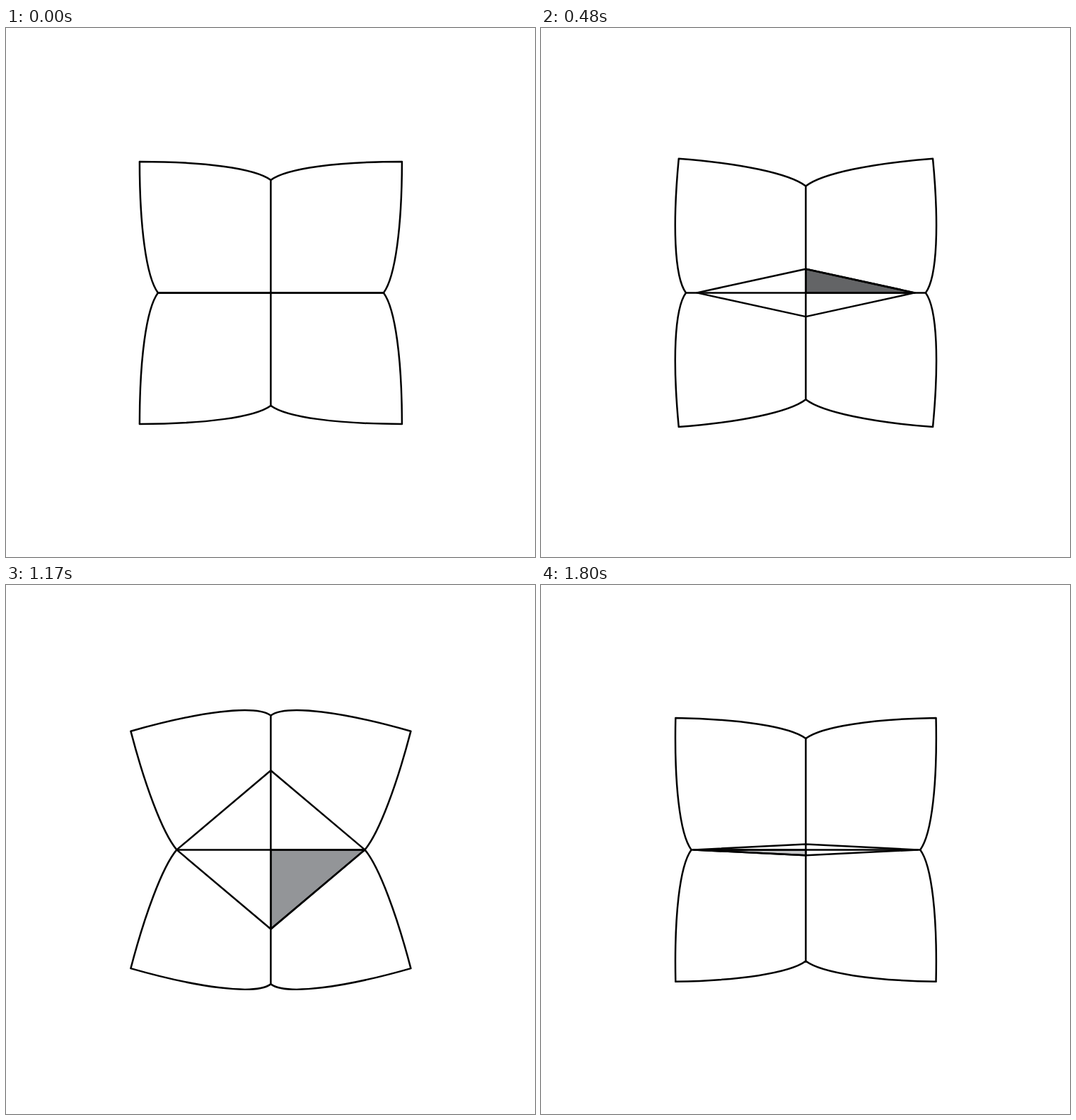
Recreate the animation shown at these times as an HTML page. Size 748 by 748 pixels, loop 1.83 s.

```html
<!DOCTYPE html>
<html lang="en">
<head>
<meta charset="utf-8">
<title>Paper fortune teller</title>
<style>
  html, body { margin: 0; width: 100%; height: 100%; overflow: hidden; background: #fff; }
  svg { display: block; width: 100vw; height: 100vh; }
  path { fill: none; stroke: #000; stroke-width: 2.5; stroke-linejoin: round; stroke-linecap: round; }
</style>
</head>
<body>
<svg viewBox="0 0 748 748">
  <g transform="translate(374.4 374.4)">
    <path id="outline"/>
    <path id="flap"/>
    <path id="diamond"/>
    <path id="cross"/>
  </g>
</svg>
<script>
const STEP = 30, LOOP = 1830;

// Moments when the paper is alternately closed and fully open
const KEYS = [0, 195, 420, 645, 885, 1125, 1365, 1575, 1815];

// Quadrant that shows its flap in each opening, with its colour
const FLAPS = [
  [-1, -1, '#231f20'],
  [1, -1, '#636466'],
  [1, 1, '#939598'],
  [-1, 1, '#c7c8ca']
];

// Cubic edge from corner to tip, and how it shifts when stretched or pinched
const REST = [[-185.5, -185.5], [-94.5, -185.4], [-22.5, -176.2], [0, -159.5]];
const STRETCH = [[-15.4, 21.9], [-12.3, -11.1], [0, -37], [0, -37.5]];
const PINCH = [[21.9, -15.4], [0, 8], [-2.5, 27.7], [0, 32.6]];

const el = id => document.getElementById(id);
const [outline, flap, diamond, cross] = ['outline', 'flap', 'diamond', 'cross'].map(el);

const bend = (shift, s) =>
  REST.map(([x, y], i) => [x + shift[i][0] * s, y + shift[i][1] * s]);
const swap = pts => pts.map(([x, y]) => [y, x]);
const text = pts => pts.map(p => p.map(n => n.toFixed(2)).join(' ')).join(' ');

function pose(t) {
  let i = 0;
  while (i < KEYS.length - 2 && t >= KEYS[i + 1]) i++;
  const u = Math.min(1, (t - KEYS[i]) / (KEYS[i + 1] - KEYS[i]));
  return { phase: i >> 1, s: i % 2 ? 1 - u : u };
}

function draw(t) {
  const { phase, s } = pose(t);
  const upright = phase % 2 === 0;
  const top = bend(upright ? STRETCH : PINCH, s);
  const side = swap(bend(upright ? PINCH : STRETCH, s));
  const tipY = -top[3][1], tipX = -side[3][0];
  const w = upright ? tipX : 159.5 - 21 * s;
  const h = (upright ? 138 : 126.5) * s;

  // One petal runs tip, corner, tip; the other three mirror it
  const petal = [...top.slice().reverse(), ...side.slice(1)];
  outline.setAttribute('d', FLAPS.map(([fx, fy]) => {
    const pts = petal.map(([x, y]) => [-x * fx, -y * fy]);
    return `M${text(pts.slice(0, 1))}C${text(pts.slice(1))}`;
  }).join(''));

  const [fx, fy, color] = FLAPS[phase];
  flap.setAttribute('d', `M0 0L${text([[fx * w, 0], [0, fy * h]])}Z`);
  flap.style.fill = color;
  diamond.setAttribute('d', `M${text([[-w, 0], [0, -h], [w, 0], [0, h]])}Z`);
  cross.setAttribute('d', `M${-tipX} 0H${tipX}M0 ${-tipY}V${tipY}`);
}

const start = performance.now();
function tick() {
  const t = (performance.now() - start) % LOOP;
  draw(Math.floor(t / STEP) * STEP);
  requestAnimationFrame(tick);
}
tick();
</script>
</body>
</html>
```
